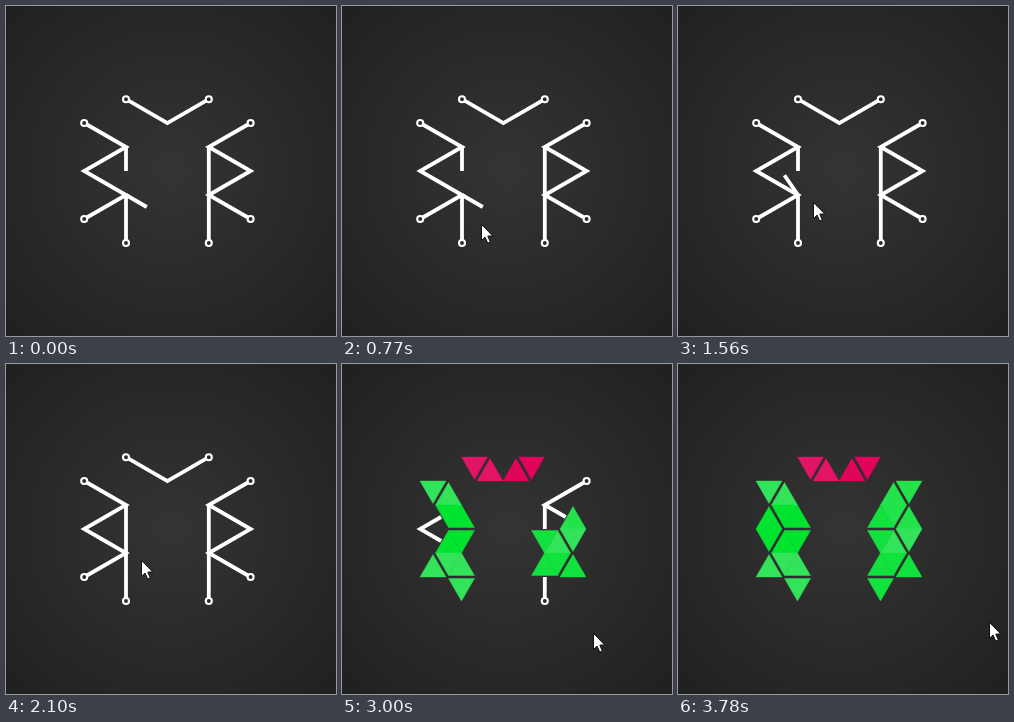
An HTML page with a canvas that plays this animation: 330x330 px, repeating every 3.83 s.

```html
<!DOCTYPE html>
<html lang="en">
<head>
<meta charset="utf-8">
<style>
html, body { margin: 0; width: 100%; height: 100%; overflow: hidden; background: #282828; }
canvas { display: block; }
</style>
</head>
<body>
<canvas id="stage" width="330" height="330"></canvas>
<script>
const ctx = document.getElementById('stage').getContext('2d');
const LOOP = 3830, STEP = 46.3, START = 246, POINTER_IN = 260;
const LINE_AXIS = 161.4, TILE_AXIS = 161;
const LEFT = 78.2, TRUNK = 120, TOP = 117, ROW = 24;
const RISE = 22.5, HALF = RISE / Math.sqrt(3), GAP = ROW - RISE;
const PALE = '#33e35a', MID = '#22e34b', SOFT = '#12e23d', PURE = '#00e430';

const backdrop = ctx.createRadialGradient(165, 165, 0, 165, 165, 233);
backdrop.addColorStop(0, '#343434');
backdrop.addColorStop(1, '#202020');

const range = (n, make) => Array.from({ length: n }, (_, i) => make(i));

// Column 0 is the outer one, 1 the inner one, 2 the trunk.
function makeTile(column, row, up, top = TOP) {
  const inner = column > 0;
  const shift = inner === (row % 2 === 0) ? GAP : 0;
  const x = 91 + 15.5 * inner + HALF * (column === 2);
  return { x, y: top + ROW * row + shift, up, row, column };
}

// Each half segment of a strand turns into one tile; letters name tiles that appear together.
const zigzag = {
  points: range(9, i => [i % 2 ? (LEFT + TRUNK) / 2 : i % 4 ? TRUNK : LEFT, TOP + i * ROW / 2]),
  tiles: range(8, i => makeTile(i % 4 % 3 ? 1 : 0, i >> 1, i % 2 === 1)),
  groups: 'ABBCCDDE', nodes: [0, 8]
};
const trunk = {
  points: range(5, i => [TRUNK, TOP + ROW * (i + 1)]),
  tiles: range(4, i => makeTile(2, i + 1, i % 2 === 0)),
  groups: 'BDDF', nodes: [4]
};
const crown = {
  points: [[120, 93.2], [140.7, 105.1], [162.4, 117.6]],
  tiles: range(2, i => ({ ...makeTile(i, 0, i === 1, TOP - ROW), x: TILE_AXIS - HALF - 15.5 * (1 - i) })),
  groups: 'GH', nodes: [0], crown: true
};
const strands = [crown, zigzag, trunk];

const sides = [
  { order: 'HBGADEFC', start: 2330, pace: 107, swings: true, red: '#e21463',
    green: ({ row }) => row === 1 || row === 2 ? PURE : PALE },
  { order: 'HGDCEBAF', start: 2460, pace: 128, flip: true, red: '#e0045a',
    green: ({ row, column }) => column === 2 ? SOFT : [MID, MID, PALE, SOFT][row] }
];

function revealTime(side, { groups }, i) {
  const group = groups[i];
  return side.start + side.pace * side.order.indexOf(group) + 25 * (i - groups.indexOf(group));
}

// Pointer stops: [time, x, y]
const route = [
  [250, 268, 326], [445, 249, 298.5], [765, 140, 220], [970, 114, 176],
  [1180, 128.5, 190], [1280, 135, 196], [2100, 135, 196], [2528, 178, 260.5],
  [2992, 252, 270], [3370, 289, 267], [3570, 289, 267], [3784, 312, 258]
];

const rate = (i, axis) => (route[i + 1][axis] - route[i][axis]) / (route[i + 1][0] - route[i][0]);

// Slope at a stop that keeps the path free of overshoot.
function slope(i, axis) {
  if (i === 0) return rate(0, axis);
  if (i === route.length - 1) return rate(i - 1, axis);
  const a = rate(i - 1, axis), b = rate(i, axis);
  return a * b > 0 ? 2 * a * b / (a + b) : 0;
}

function pointerAt(t) {
  const found = route.findIndex(stop => stop[0] > t);
  if (found < 0) return route[route.length - 1].slice(1);
  const i = Math.max(0, found - 1);
  const span = route[i + 1][0] - route[i][0], u = (t - route[i][0]) / span, v = 1 - u;
  return [1, 2].map(axis =>
    v * v * ((1 + 2 * u) * route[i][axis] + u * span * slope(i, axis)) +
    u * u * ((1 + 2 * v) * route[i + 1][axis] - v * span * slope(i + 1, axis)));
}

function polygon(points) {
  ctx.beginPath();
  points.forEach(p => ctx.lineTo(...p));
  ctx.closePath();
}

function drawTile({ x, y, up }, color) {
  const base = up ? y + RISE : y, apex = up ? y : y + RISE;
  polygon([[x - HALF, base], [x + HALF, base], [x, apex]]);
  ctx.fillStyle = ctx.strokeStyle = color;
  ctx.lineWidth = 0.4;
  ctx.fill();
  ctx.stroke();
}

function drawStrand(side, strand, t, swing) {
  const { points, groups, nodes } = strand;
  const swinging = side.swings && strand === trunk && swing < 1;
  const shown = i => t < revealTime(side, strand, i) && !(swinging && i === 1);

  ctx.strokeStyle = '#fff';
  ctx.lineWidth = 3.8;
  ctx.beginPath();
  for (let i = 0; i < groups.length; i++) {
    if (!shown(i)) continue;
    if (i === 0 || !shown(i - 1)) ctx.moveTo(...points[i]);
    ctx.lineTo(...points[i + 1]);
  }
  if (swinging) {
    const eased = 1 - Math.pow(1 - swing, 1.4);
    const angle = (30 + 240 * eased) * Math.PI / 180;
    const [x, y] = points[2];
    ctx.moveTo(x, y);
    ctx.lineTo(x + ROW * Math.cos(angle), y + ROW * Math.sin(angle));
  }
  ctx.stroke();

  ctx.fillStyle = '#2b2b2b';
  ctx.lineWidth = 2.1;
  for (const n of nodes) {
    if (!shown(Math.min(n, groups.length - 1))) continue;
    ctx.beginPath();
    ctx.arc(...points[n], 3, 0, 2 * Math.PI);
    ctx.fill();
    ctx.stroke();
  }
}

function drawTiles(side, strand, t) {
  strand.tiles.forEach((tile, i) => {
    if (t >= revealTime(side, strand, i)) {
      drawTile(tile, strand.crown ? side.red : side.green(tile));
    }
  });
}

function eachStrand(axis, draw) {
  for (const side of sides) {
    ctx.save();
    if (side.flip) {
      ctx.translate(2 * axis, 0);
      ctx.scale(-1, 1);
    }
    strands.forEach(strand => draw(side, strand));
    ctx.restore();
  }
}

function drawPointer(x, y) {
  ctx.save();
  ctx.translate(Math.floor(x) + 0.5, Math.floor(y) + 0.5);
  polygon([[0, 0], [0, 16], [3.6, 12.6], [6.2, 18.6], [8.8, 17.5], [6.3, 11.6], [11.2, 11.4]]);
  ctx.fillStyle = '#fff';
  ctx.strokeStyle = '#111';
  ctx.lineWidth = 1;
  ctx.fill();
  ctx.stroke();
  ctx.restore();
}

function render(time) {
  const step = Math.floor((time - START) / STEP);
  const t = POINTER_IN + step * STEP;
  const swing = Math.max(0, Math.min(1, (step - 25) / 4));
  ctx.fillStyle = backdrop;
  ctx.fillRect(0, 0, 330, 330);
  eachStrand(LINE_AXIS, (side, strand) => drawStrand(side, strand, t, swing));
  eachStrand(TILE_AXIS, (side, strand) => drawTiles(side, strand, t));
  if (time >= POINTER_IN) drawPointer(...pointerAt(t));
}

const origin = performance.now();
function tick() {
  render((performance.now() - origin) % LOOP);
  requestAnimationFrame(tick);
}
tick();
</script>
</body>
</html>
```
